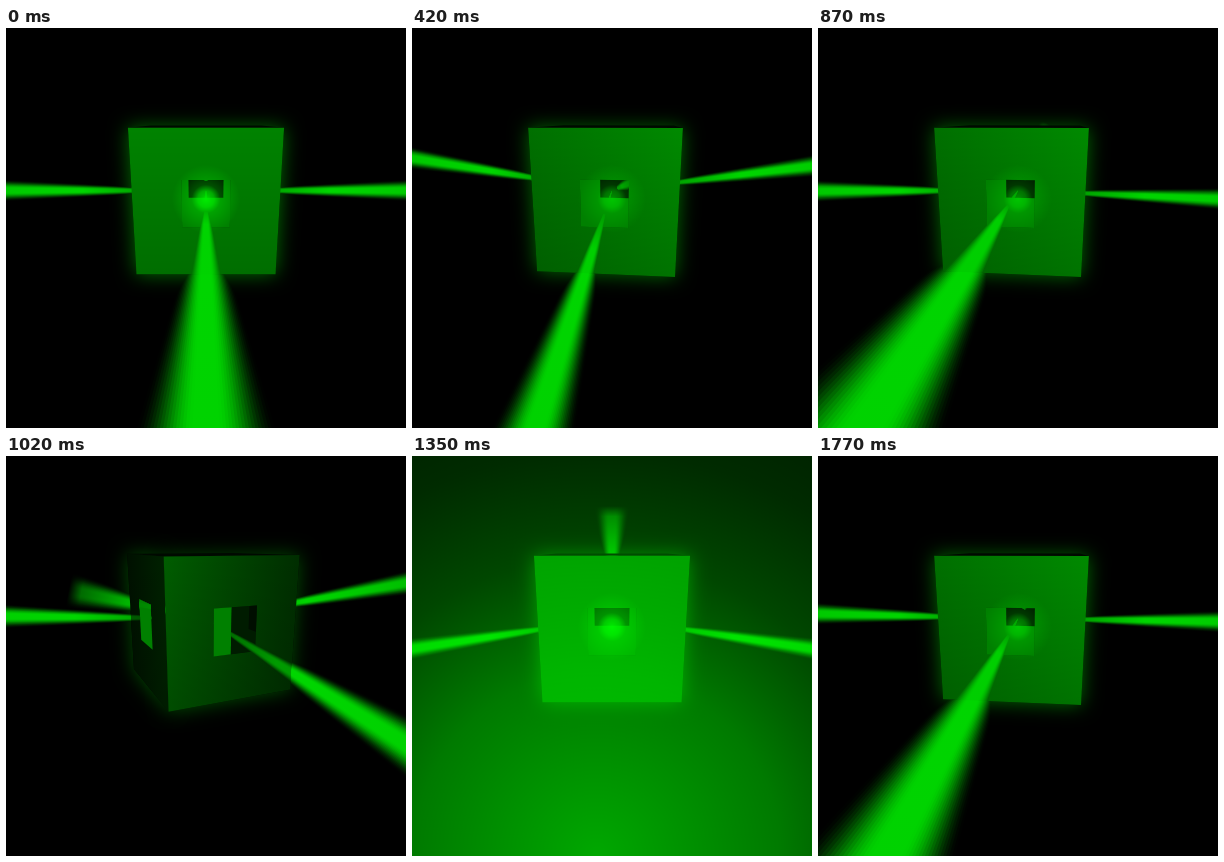
An HTML page with a canvas for the animation above (1.8 s loop, 400 by 400 pixels).

```html
<!DOCTYPE html>
<html>
<head>
<meta charset="utf-8">
<style>
html, body { margin: 0; width: 100%; height: 100%; overflow: hidden; background: #000; }
canvas { display: block; width: 400px; height: 400px; }
</style>
</head>
<body>
<canvas id="stage" width="400" height="400"></canvas>
<script>
const ctx = document.getElementById('stage').getContext('2d');
const LOOP = 1800, STEP = 30, RAD = Math.PI / 180;
const CAM = { y: 1.105, z: 5.871, sin: 0.284, cos: 0.959, focal: 367 };
const HOLE = 0.33, FLOOR = -1.03, SPREAD = 0.054, REACH = 32, LAYERS = 18, BRIGHT = 214;

const green = v => `rgb(0,${Math.round(Math.max(0, Math.min(255, v)))},0)`;
const clamp01 = v => Math.max(0, Math.min(1, v));
const smooth = (a, b, v) => { const x = clamp01((v - a) / (b - a)); return x * x * (3 - 2 * x); };
const bell = (v, width) => Math.exp(-((v / width) ** 2));

// Camera space is [right, up, depth].
const rotate = ([x, y, z]) => [x, y * CAM.cos - z * CAM.sin, -z * CAM.cos - y * CAM.sin];
const view = ([x, y, z]) => rotate([x, y - CAM.y, z - CAM.z]);
const screen = ([x, u, d]) => [200 + CAM.focal * x / d, 200 - CAM.focal * u / d];
const project = p => screen(view(p));
const cross = (a, b) => [a[1] * b[2] - a[2] * b[1], a[2] * b[0] - a[0] * b[2], a[0] * b[1] - a[1] * b[0]];
const unit = a => { const n = Math.hypot(...a) || 1; return a.map(v => v / n); };
const along = (p, dir, len) => p.map((v, i) => v + dir[i] * len);
const lamp = view([0, 0, 0]);

function addPolygon(points) {
  points.forEach((p, i) => i ? ctx.lineTo(p[0], p[1]) : ctx.moveTo(p[0], p[1]));
  ctx.closePath();
}
function fill(points, style) {
  ctx.beginPath();
  addPolygon(points);
  ctx.fillStyle = style;
  ctx.fill();
}
function clipped(polygons, rule, paint) {
  ctx.save();
  ctx.beginPath();
  polygons.forEach(addPolygon);
  ctx.clip(rule);
  paint();
  ctx.restore();
}

// Rectangle on the wall that faces the given direction.
function wallQuad(deg, half, low, high) {
  const s = Math.sin(deg * RAD), c = Math.cos(deg * RAD);
  const at = (a, y) => project([s + a * c, y, c - a * s]);
  return [at(-half, high), at(half, high), at(half, low), at(-half, low)];
}
const wall = deg => wallQuad(deg, 1, FLOOR, 1);
const hole = deg => wallQuad(deg, HOLE, -HOLE, HOLE);
const STAGE = [[0, 0], [400, 0], [400, 400], [0, 400]];

function makeSide(index, turn) {
  let deg = (turn - index * 90) % 360;
  if (deg > 180) deg -= 360;
  if (deg <= -180) deg += 360;
  const t = turn * RAD;
  const swing = 0.147 * Math.sin(t) - 0.044 * Math.sin(2 * t) - 0.006 * Math.sin(3 * t);
  const tilt = index % 2 ? -swing : swing;
  const s = Math.sin(deg * RAD), c = Math.cos(deg * RAD);
  const axis = rotate([s, tilt, c]);
  const aim = Math.acos(Math.min(1, -unit(axis).reduce((sum, v, i) => sum + v * unit(lamp)[i], 0)));
  return { deg, axis, open: c * CAM.z > 1, facing: c, dazzle: clamp01((0.08 - aim) / 0.04) };
}

function drawBeam({ axis, dazzle }, from, to, bright = BRIGHT) {
  const power = bright * (1 - dazzle);
  if (power < 1) return;
  const normal = unit(cross(axis, lamp));
  const limit = dir => dir[2] < 0 ? Math.min(to, (lamp[2] - 0.05) / -dir[2]) : to;
  const end = limit(axis);
  const start = screen(lamp), stop = screen(along(lamp, axis, end));
  const span = Math.hypot(stop[0] - start[0], stop[1] - start[1]) || 1;
  const stops = [[0, 0.6], [1, 0.75], [2, 1], [6, 0.84], [20, 0.5], [REACH, 0]]
    .filter(([len]) => len <= end)
    .map(([len, v]) => {
      const p = screen(along(lamp, axis, len));
      return [clamp01(Math.hypot(p[0] - start[0], p[1] - start[1]) / span), v];
    });
  ctx.save();
  ctx.globalCompositeOperation = 'lighten';
  for (let i = 0; i < LAYERS; i++) {
    const w = 1 - 0.85 * i / LAYERS;
    const level = power * smooth(0, 1, (i + 1) / LAYERS);
    const paint = ctx.createLinearGradient(...start, ...stop);
    stops.forEach(([pos, v]) => paint.addColorStop(pos, green(level * v)));
    const edges = [-1, 1].map(sign => along(axis, normal, sign * SPREAD * w));
    const near = edges.map(e => screen(along(lamp, e, from)));
    const far = edges.map(e => screen(along(lamp, e, limit(e))));
    fill([near[0], far[0], far[1], near[1]], paint);
  }
  ctx.restore();
}

function drawInterior(side, sides) {
  clipped([hole(side.deg)], 'nonzero', () => {
    fill(hole(side.deg), green(25));
    for (const s of sides.filter(o => !o.open)) {
      fill(wall(s.deg), green(28 + 100 * smooth(0.5, 0.8, -s.facing)));
      fill(hole(s.deg), green(14));
      drawBeam(s, 1, REACH, 150);
    }
    drawBeam(side, 0, 1.3, 150);
  });
}

function drawFace(side) {
  const quad = wall(side.deg);
  const base = 24 + 106 * bell(side.deg, 26);
  const lean = 0.35 * Math.max(-1, Math.min(1, side.deg / 20));
  const paint = ctx.createLinearGradient(quad[0][0], 0, quad[1][0], 0);
  paint.addColorStop(0, green(base * (1 + lean)));
  paint.addColorStop(1, green(base * (1 - lean)));
  fill(quad, paint);
  const shade = ctx.createLinearGradient(0, 100, 0, 250);
  shade.addColorStop(0, 'rgba(0,0,0,0)');
  shade.addColorStop(1, 'rgba(0,0,0,0.16)');
  fill(quad, shade);
}

function drawGlow(x, y, radius, stops, power) {
  const paint = ctx.createRadialGradient(x, y, 0, x, y, radius);
  stops.forEach(([pos, alpha]) => paint.addColorStop(pos, `rgba(0,255,0,${alpha * power})`));
  ctx.save();
  ctx.globalCompositeOperation = 'screen';
  ctx.fillStyle = paint;
  ctx.fillRect(0, 0, 400, 400);
  ctx.restore();
}

function draw(ms) {
  const turn = ms / LOOP * 360;
  const sides = [0, 1, 2, 3].map(i => makeSide(i, turn)).sort((a, b) => a.facing - b.facing);
  const front = sides[3];
  const visible = sides.filter(s => s.open);
  const walls = visible.map(s => wall(s.deg));
  const lid = [45, 135, 225, 315].map(a => {
    const r = (front.deg + a) * RAD;
    return project([Math.SQRT2 * Math.sin(r), 1, Math.SQRT2 * Math.cos(r)]);
  });

  ctx.fillStyle = '#000';
  ctx.fillRect(0, 0, 400, 400);

  ctx.save();
  ctx.shadowBlur = 19;
  ctx.shadowColor = green(66 + 44 * bell(front.deg, 20));
  walls.forEach(quad => fill(quad, '#000'));
  ctx.restore();

  sides.filter(s => !s.open).forEach(s => drawBeam(s, 1, REACH));
  fill(lid, green(9));
  for (const s of visible) {
    drawFace(s);
    drawInterior(s, sides);
  }

  drawGlow(200, 171, 34, [[0, 0.85], [0.24, 0.65], [0.42, 0.27], [1, 0]], bell(front.deg, 9));

  // Beams look weaker where they cross the lit cube.
  clipped(walls, 'nonzero', () => visible.forEach(s => drawBeam(s, 1, REACH, 112 + 100 * bell(s.deg, 26))));
  clipped([STAGE, ...walls], 'evenodd', () => visible.forEach(s => drawBeam(s, 1, REACH)));

  const wash = Math.max(...sides.map(s => s.dazzle));
  if (wash) drawGlow(185, 400, 460, [[0, 0.66], [0.4, 0.48], [0.65, 0.28], [0.88, 0.17], [1, 0.14]], wash);
}

const begin = performance.now();
function tick() {
  const elapsed = Math.max(0, performance.now() - begin) % LOOP;
  draw(Math.floor(elapsed / STEP) * STEP);
  requestAnimationFrame(tick);
}
tick();
</script>
</body>
</html>
```
